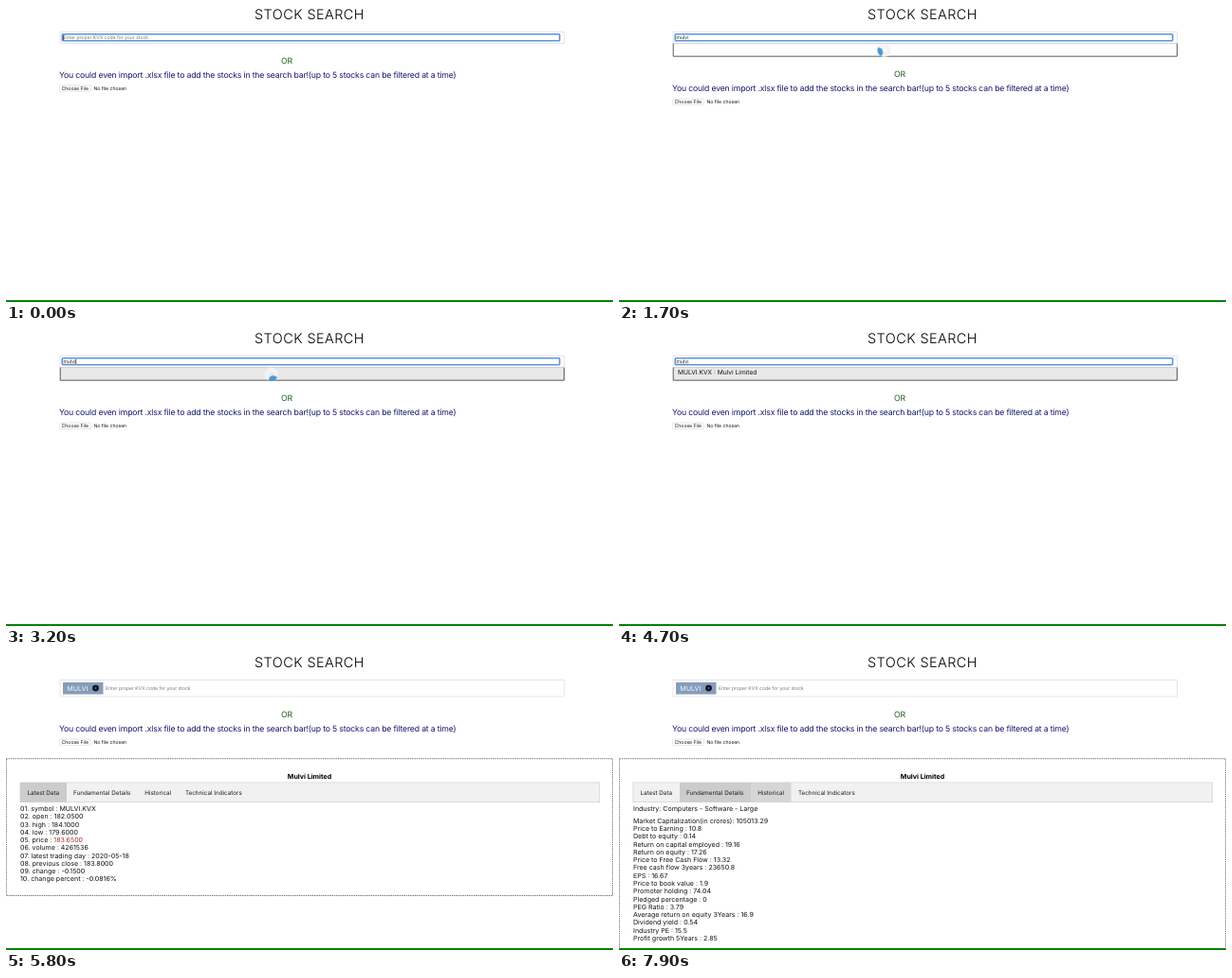
Write an HTML page that moves like this. It is 640 px wide and 313 px high and loops after 8000 ms.

```html
<!DOCTYPE html>
<html lang="en">
<head>
<meta charset="utf-8">
<title>Stock search</title>
<style>
html, body { margin: 0; width: 100%; height: 100%; overflow: hidden; background: #fff; }
svg { display: block; width: 100vw; height: 100vh; }
text { font: 7.06px Inter, "Open Sans", sans-serif; fill: #111; text-rendering: geometricPrecision; white-space: pre; }

.title { font-size: 14.5px; font-weight: 300; letter-spacing: .4px; text-anchor: middle; fill: #000; }
.or { font-size: 8.7px; text-anchor: middle; fill: #1f5c1f; }
.note { font-size: 8.7px; letter-spacing: -.178px; fill: #16166e; }
.small { font-size: 5.1px; }
.hint { font-size: 5.07px; fill: #777; }
.typed { font-size: 5.1px; fill: #222; }
.option { font-size: 6.65px; }
.name { font-size: 7.1px; font-weight: 700; text-anchor: middle; fill: #000; }
.tag { font-size: 7.1px; fill: #f2f5fa; }
.tabs text { font-size: 6.3px; fill: #1c1c1c; }
.price { fill: #a03038; }

/* hard switches share one 8 s clock */
.step { animation: 8s step-end infinite; }
.search { animation-name: search; }
.result { animation-name: result; }
.help { animation-name: help; }
.empty { animation-name: empty; }
.drop { animation-name: drop; }
.hover { animation-name: hover; }
.wait { animation-name: wait; }
.found { animation-name: found; }
.spell { animation-name: spell; }
.load { animation-name: load; }
.latest { animation-name: latest; }
.basics { animation-name: basics; }
.panel { animation-name: panel; }
.caret { animation-name: caret, blink; animation-duration: 8s, 1s; }
.k1 { animation-name: k1; }
.k2 { animation-name: k2; }
.k3 { animation-name: k3; }
.k4 { animation-name: k4; }
.k5 { animation-name: k5; }
.tab3 { animation-name: tab3; }

@keyframes search { 0% { opacity: 1 } 60%, 100% { opacity: 0 } }
@keyframes result { 0% { opacity: 0 } 60%, 100% { opacity: 1 } }
@keyframes help {
  0% { transform: translateY(0) }
  3.75% { transform: translateY(14.2px) }
  60%, 100% { transform: translateY(6px) }
}
@keyframes empty { 0% { opacity: 1 } 2.5%, 100% { opacity: 0 } }
@keyframes drop { 0% { opacity: 0 } 3.75%, 100% { opacity: 1 } }
@keyframes hover { 0% { fill: #fff } 31.25%, 100% { fill: #e9e9e9 } }
@keyframes wait { 0% { opacity: 1 } 53.75%, 100% { opacity: 0 } }
@keyframes found { 0% { opacity: 0 } 53.75%, 100% { opacity: 1 } }
@keyframes spell { 0% { opacity: 0 } 25%, 100% { opacity: 1 } }
@keyframes load { 0% { opacity: 1 } 70%, 100% { opacity: 0 } }
@keyframes latest { 0% { opacity: 0 } 70% { opacity: 1 } 78.75%, 100% { opacity: 0 } }
@keyframes basics { 0% { opacity: 0 } 78.75%, 100% { opacity: 1 } }
@keyframes panel { 0% { height: 83px } 70% { height: 144.8px } 78.75%, 100% { height: 230px } }
@keyframes caret {
  0% { transform: translateX(0) }
  2.5% { transform: translateX(4.6px) }
  6.25% { transform: translateX(7.6px) }
  10% { transform: translateX(8.9px) }
  13.75% { transform: translateX(11.8px) }
  16.25%, 100% { transform: translateX(13.2px) }
}
@keyframes blink { 0% { opacity: 1 } 50%, 100% { opacity: 0 } }
@keyframes k1 { 0% { opacity: 0 } 2.5%, 100% { opacity: 1 } }
@keyframes k2 { 0% { opacity: 0 } 6.25%, 100% { opacity: 1 } }
@keyframes k3 { 0% { opacity: 0 } 10%, 100% { opacity: 1 } }
@keyframes k4 { 0% { opacity: 0 } 13.75%, 100% { opacity: 1 } }
@keyframes k5 { 0% { opacity: 0 } 16.25%, 100% { opacity: 1 } }
@keyframes tab3 { 0% { fill: #f1f1f1 } 93.75%, 100% { fill: #d6d6d6 } }

/* tab shades fade */
.tab1 { animation: tab1 8s linear infinite; }
.tab2 { animation: tab2 8s linear infinite; }
@keyframes tab1 { 0%, 78.75% { fill: #ccc } 82.5%, 100% { fill: #f1f1f1 } }
@keyframes tab2 { 0%, 75% { fill: #f1f1f1 } 78.5% { fill: #ddd } 82.5%, 100% { fill: #ccc } }

.spin { animation: spin 2s linear infinite; }
.spin circle { fill: none; stroke: #f3f3f3; }
.spin .arc { stroke: #4a97d2; stroke-dasharray: 2 6; stroke-dashoffset: -5; }
@keyframes spin { to { transform: rotate(360deg) } }
</style>
</head>
<body>
<svg viewBox="0 0 640 313" preserveAspectRatio="none">
  <text class="title" x="320" y="13.9">STOCK SEARCH</text>

  <g class="step help">
    <text class="or" x="296" y="61.3">OR</text>
    <text class="note" x="56" y="76.3">You could even import .xlsx file to add the stocks in the search bar!(up to 5 stocks can be filtered at a time)</text>
    <rect x="56.3" y="84" width="33.4" height="6.3" rx="1" fill="#fff" stroke="#d6d6d6" stroke-width=".6"/>
    <text class="small" x="58.6" y="88.9">Choose File</text>
    <text class="small" x="92.4" y="88.9">No file chosen</text>
  </g>

  <g class="step search">
    <rect x="57" y="27.5" width="531.5" height="12" fill="none" stroke="#e0e0e4" stroke-width=".8"/>
    <rect x="59.3" y="29.8" width="524.4" height="6.9" rx=".8" fill="#fff" stroke="#5c93dc" stroke-width="1.6"/>
    <text class="hint step empty" x="60.5" y="35.1">Enter proper KVX code for your stock</text>
    <text class="typed" x="60.5" y="35.1"><tspan class="step k1">m</tspan><tspan class="step k2">u</tspan><tspan class="step k3">l</tspan><tspan class="step k4">v</tspan><tspan class="step k5">i</tspan></text>
    <path class="step spell" d="M60.5 36H73.5" stroke="#8a7474" stroke-width=".6" stroke-dasharray="1 .5"/>
    <rect class="step caret" x="60.3" y="30.8" width=".7" height="5.2" fill="#111"/>
    <g class="step drop">
      <rect class="step hover" x="57" y="39.7" width="531.5" height="13.6"/>
      <path d="M57 39.7H588.5" stroke="#bbb" stroke-width=".6"/>
      <path d="M57.2 39.7V53.2H588.4V39.7" fill="none" stroke="#4a4a4a" stroke-width=".9"/>
      <g class="step wait">
        <g transform="translate(279.7 46.8)">
          <g class="spin" style="animation-delay:-1.7s" stroke-width="5">
            <circle r="4.7"/>
            <circle class="arc" r="4.7" pathLength="8"/>
          </g>
        </g>
      </g>
      <text class="option step found" x="62" y="47.3">MULVI.KVX : Mulvi Limited</text>
    </g>
  </g>

  <g class="step result">
    <rect x="57" y="27.5" width="531.5" height="17.5" fill="none" stroke="#e0e0e0" stroke-width=".8"/>
    <rect x="60" y="30" width="42.5" height="12.6" fill="#859dbc"/>
    <text class="tag" x="64.3" y="38.8">MULVI</text>
    <circle cx="94.5" cy="36.1" r="3.4" fill="#141414"/>
    <path d="M93.7 35.3l1.6 1.6m0-1.6l-1.6 1.6" stroke="#ddd" stroke-width=".5"/>
    <text class="hint" x="105" y="38">Enter proper KVX code for your stock</text>

    <rect class="step panel" x=".4" y="110.7" width="639.2" height="83" fill="none" stroke="#444" stroke-width=".75" stroke-dasharray="1.4 .9"/>
    <text class="name" x="320" y="131.6">Mulvi Limited</text>
    <g class="tabs">
      <rect x="15" y="136" width="610.7" height="20.7" fill="#f1f1f1"/>
      <rect class="tab1" x="15" y="136" width="49" height="20.7"/>
      <rect class="tab2" x="64" y="136" width="75" height="20.7"/>
      <rect class="step tab3" x="139" y="136" width="42.5" height="20.7"/>
      <rect x="14.9" y="135.9" width="610.8" height="20.8" fill="none" stroke="#ccc" stroke-width=".6"/>
      <text x="22.4" y="148.7">Latest Data</text>
      <text x="71" y="148.7">Fundamental Details</text>
      <text x="146.2" y="148.7">Historical</text>
      <text x="189" y="148.7">Technical Indicators</text>
    </g>
    <g class="step load">
      <g transform="translate(270.5 167.9)">
        <g class="spin" style="animation-delay:-1.23s" stroke-width="4.4">
          <circle r="8.6"/>
          <circle class="arc" r="8.6" pathLength="8"/>
        </g>
      </g>
    </g>
    <g class="step latest" id="latest"></g>
    <g class="step basics" id="basics">
      <text x="15" y="166">Industry: Computers - Software - Large</text>
    </g>
  </g>

  <rect y="311" width="640" height="2" fill="#008000"/>
</svg>
<script>
const quote = {
  symbol: "MULVI.KVX", open: "182.0500", high: "184.1000", low: "179.6000",
  price: "183.6500", volume: "4261536", "latest trading day": "2020-05-18",
  "previous close": "183.8000", change: "-0.1500", "change percent": "-0.0816%"
};
const basics = [
  "Market Capitalization(in crores): 105013.29", "Price to Earning : 10.8",
  "Debt to equity : 0.14", "Return on capital employed : 19.16",
  "Return on equity : 17.26", "Price to Free Cash Flow : 13.32",
  "Free cash flow 3years : 23650.8", "EPS : 16.67", "Price to book value : 1.9",
  "Promoter holding : 74.04", "Pledged percentage : 0", "PEG Ratio : 3.79",
  "Average return on equity 3Years : 16.9", "Dividend yield : 0.54",
  "Industry PE : 15.5", "Profit growth 5Years : 2.85"
];
const SVG = "http://www.w3.org/2000/svg";

function addRows(id, rows, top) {
  rows.forEach((row, i) => {
    const line = document.createElementNS(SVG, "text");
    line.setAttribute("x", 15);
    line.setAttribute("y", top + i * 8.27);
    line.innerHTML = row;
    document.getElementById(id).append(line);
  });
}

addRows("latest", Object.entries(quote).map(([key, value], i) => {
  const shown = key === "price" ? `<tspan class="price">${value}</tspan>` : value;
  return `${String(i + 1).padStart(2, "0")}. ${key} : ${shown}`;
}), 166);
addRows("basics", basics, 178.8);
</script>
</body>
</html>
```
